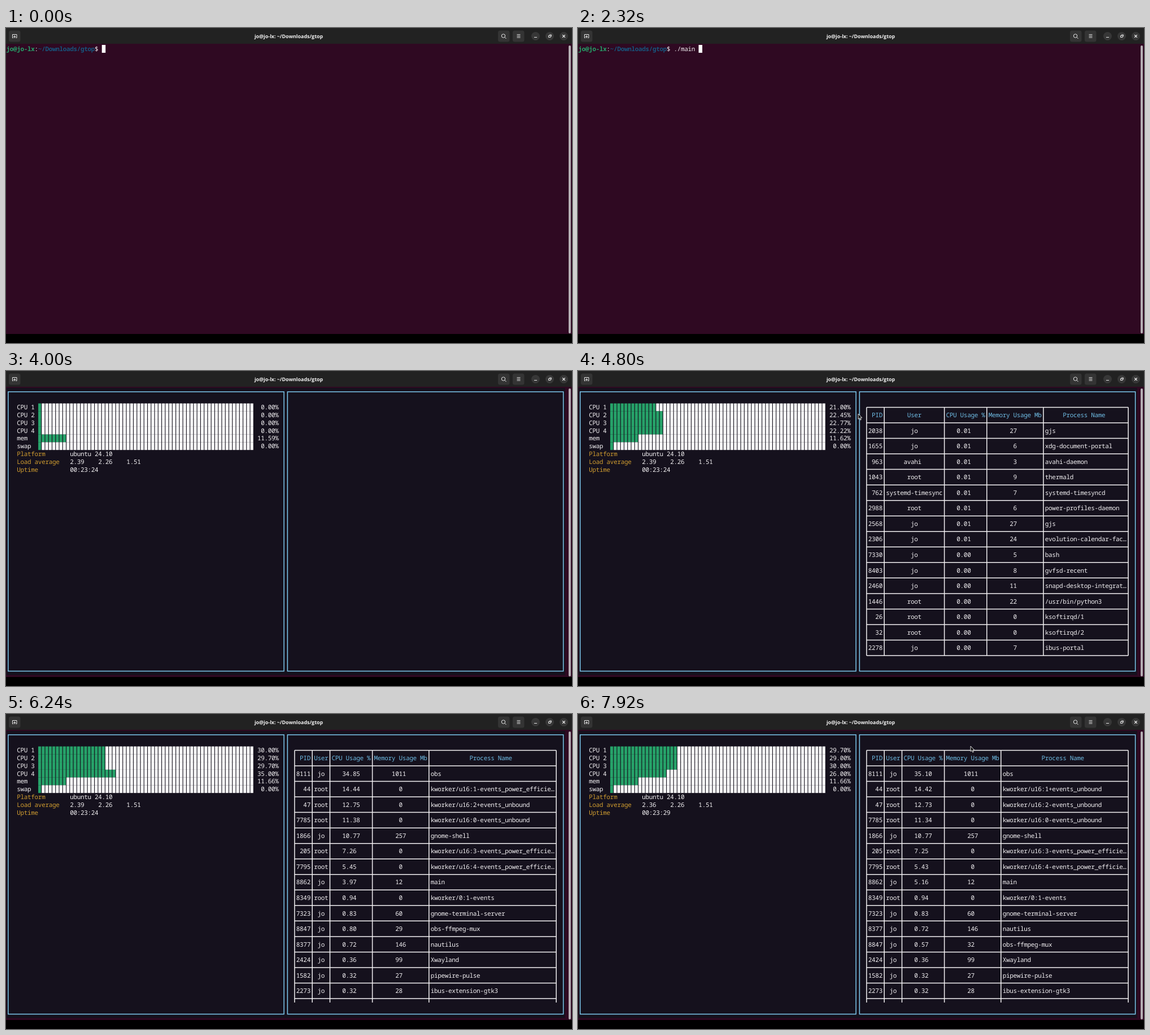
Animation, 1002 px wide and 559 px high, one loop 8000 ms. Source, as an HTML page with a canvas:

```html
<!DOCTYPE html>
<html lang="en">
<head>
<meta charset="utf-8">
<title>Terminal system monitor</title>
<style>
  html, body { margin: 0; width: 100%; height: 100%; overflow: hidden; background: #000; }
  canvas { display: block; width: 1002px; height: 559px; }
</style>
</head>
<body>
<canvas id="stage" width="1002" height="559"></canvas>
<script>
const ctx = document.getElementById('stage').getContext('2d');
ctx.textRendering = 'geometricPrecision';

const LOOP = 8000, CELL_W = 6.26, CELL_H = 13.77;
const MONO = '11px "Noto Sans Mono", "DejaVu Sans Mono", monospace';
const WHITE = '#f3f1f3', GREEN = '#26a269', BLUE = '#7dc8ee', GOLD = '#cf9c30', DARK = '#15111d';

// Terminal grid
const colX = col => 0.7 + col * CELL_W;
const rowY = row => 30 + row * CELL_H;
const midX = col => colX(col + 0.5);
const midY = row => rowY(row + 0.5);

function rect(x, y, w, h, color) {
  ctx.fillStyle = color;
  ctx.fillRect(x, y, w, h);
}

function roundRect(x, y, w, h, r, color) {
  ctx.fillStyle = color;
  ctx.beginPath();
  ctx.roundRect(x, y, w, h, r);
  ctx.fill();
}

function stroke(path, color = '#e8e8e8', width = 1) {
  ctx.strokeStyle = color;
  ctx.lineWidth = width;
  ctx.stroke(new Path2D(path));
}

function print(col, row, text, color = WHITE, bold = false) {
  ctx.font = (bold ? 'bold ' : '') + MONO;
  ctx.textAlign = 'center';
  ctx.fillStyle = color;
  [...text].forEach((char, i) => {
    if (char !== ' ') ctx.fillText(char, midX(col + i), rowY(row) + 10.8);
  });
}

function printCentered(col, width, row, text, color) {
  print(col + Math.floor((width - text.length) / 2), row, text, color);
}

// Latest entry of a [time, value] timeline
const at = (timeline, t) => timeline.findLast(([start]) => t >= start)[1];

const parse = text => text.trim().split('\n').map(line => line.trim().split(' '));

const firstProcesses = parse(`
  2038 jo 0.01 27 gjs
  1655 jo 0.01 6 xdg-document-portal
  963 avahi 0.01 3 avahi-daemon
  1043 root 0.01 9 thermald
  762 systemd-timesync 0.01 7 systemd-timesyncd
  2988 root 0.01 6 power-profiles-daemon
  2568 jo 0.01 27 gjs
  2306 jo 0.01 24 evolution-calendar-fac…
  7330 jo 0.00 5 bash
  8403 jo 0.00 8 gvfsd-recent
  2460 jo 0.00 11 snapd-desktop-integrat…
  1446 root 0.00 22 /usr/bin/python3
  26 root 0.00 0 ksoftirqd/1
  32 root 0.00 0 ksoftirqd/2
  2278 jo 0.00 7 ibus-portal`);

const busiest = parse(`
  8111 jo 34.85 1011 obs
  44 root 14.44 0 kworker/u16:1-events_power_efficie…
  47 root 12.75 0 kworker/u16:2+events_unbound
  7785 root 11.38 0 kworker/u16:0-events_unbound
  1866 jo 10.77 257 gnome-shell
  205 root 7.26 0 kworker/u16:3-events_power_efficie…
  7795 root 5.45 0 kworker/u16:4-events_power_efficie…
  8862 jo 3.97 12 main
  8349 root 0.94 0 kworker/0:1-events
  7323 jo 0.83 60 gnome-terminal-server
  8847 jo 0.80 29 obs-ffmpeg-mux
  8377 jo 0.72 146 nautilus
  2424 jo 0.36 99 Xwayland
  1582 jo 0.32 27 pipewire-pulse
  2273 jo 0.32 28 ibus-extension-gtk3`);

const updates = parse(`
  8111 jo 35.10 1011 obs
  44 root 14.42 0 kworker/u16:1+events_unbound
  47 root 12.73 0 kworker/u16:2-events_unbound
  7785 root 11.34 0 kworker/u16:0-events_unbound
  205 root 7.25 0 kworker/u16:3-events_power_efficie…
  7795 root 5.43 0 kworker/u16:4-events_power_efficie…
  8862 jo 5.16 12 main
  8847 jo 0.57 32 obs-ffmpeg-mux`);

const busiestLater = busiest
  .map(old => updates.find(([pid]) => pid === old[0]) || old)
  .sort((a, b) => b[2] - a[2]);

const tables = [
  [0, null],
  [4480, { rows: firstProcesses }],
  [6160, { rows: busiest, more: true }],
  [6960, { rows: busiestLater, more: true }],
];

// Each meter: percentage and number of filled cells
const idle = ['0.00', 1];
const meters = [
  [0, [idle, idle, idle, idle, idle, idle]],
  [3440, [idle, idle, idle, idle, ['11.59', 8], idle]],
  [4480, [['21.00', 13], ['22.45', 15], ['22.77', 15], ['22.22', 15], ['11.62', 8], idle]],
  [6160, [['30.00', 19], ['29.70', 19], ['29.70', 19], ['35.00', 22], ['11.66', 8], idle]],
  [7920, [['29.70', 19], ['29.00', 19], ['30.00', 19], ['26.00', 16], ['11.66', 8], idle]],
];
const meterNames = ['CPU 1', 'CPU 2', 'CPU 3', 'CPU 4', 'mem', 'swap'];

const typing = [[0, ''], [1360, '.'], [1520, './'], [1840, './m'], [2000, './main ']];
const START = 2400;

function drawWindow() {
  rect(0, 0, 1002, 559, '#000');
  rect(0, 28, 1002, 515, '#2f0922');
  rect(0, 0, 1002, 28, '#222');
  ctx.font = 'bold 8.9px "Open Sans", "Noto Sans", sans-serif';
  ctx.textAlign = 'center';
  ctx.fillStyle = '#f4f4f4';
  ctx.fillText('jo@jo-lx: ~/Downloads/gtop', 500.5, 17.5);

  for (const x of [5, 871, 897]) roundRect(x, 4.5, 20.5, 20, 3.5, '#343434');
  for (const x of [937.5, 962.5, 987.5]) roundRect(x - 7.5, 7, 15, 15, 7.5, '#373737');
  stroke('M13 17.5h-1.5v-6h7.500v6h-1.5M15.200 13v5M13 15.500h4.500');
  stroke('M883.700 14a3.200 3.200 0 1 1-6.400 0a3.200 3.200 0 1 1 6.400 0M882.800 16.300l2.700 2.700');
  stroke('M904.500 11.700h6M904.500 14.300h6M904.500 16.900h6');
  stroke('M935 16.500h5');
  stroke('M960.500 13.500h3.500v3h-3.500zM961.800 12h3.600v3.200');
  stroke('M985.200 12.200l4.600 4.600M989.800 12.200l-4.600 4.600', '#fff', 1.2);
  roundRect(996, 31, 4, 511, 2, '#b6afb4');
}

function drawPrompt(t) {
  const typed = at(typing, t);
  print(0, 0, 'jo@jo-lx', GREEN, true);
  print(8, 0, ':');
  print(9, 0, '~/Downloads/gtop', '#17557d', true);
  print(25, 0, '$ ' + typed);
  const blinkedOff = t >= 1200 && t < 1360;
  if (!blinkedOff) rect(colX(27 + typed.length), 30, 6.5, 14, '#fff');
}

function drawPane(first, last) {
  ctx.strokeStyle = BLUE;
  ctx.lineWidth = 1.5;
  ctx.strokeRect(midX(first), midY(0), midX(last) - midX(first), midY(36) - midY(0));
}

function drawMeters(t) {
  at(meters, t).forEach(([percent, filled], i) => {
    const row = 2 + i;
    print(3, row, meterNames[i]);
    for (let n = 0; n < 61; n++) {
      rect(colX(9 + n), rowY(row), 5.1, CELL_H, n < filled ? GREEN : '#fff');
    }
    print(71, row, (percent + '%').padStart(6));
  });
}

function drawInfo(t) {
  const later = t >= 7440;
  const lines = [
    ['Platform', 'ubuntu 24.10'],
    ['Load average', (later ? '2.36' : '2.39') + '    2.26    1.51'],
    ['Uptime', later ? '00:23:29' : '00:23:24'],
  ];
  lines.forEach(([label, value], i) => {
    print(3, 8 + i, label, GOLD);
    print(18, 8 + i, value);
  });
}

function drawTable({ rows, more }) {
  const userWidth = Math.max(4, ...rows.map(row => row[1].length));
  const afterUser = 87 + userWidth;
  const edges = [81, 86, afterUser, afterUser + 12, afterUser + 28, 155];
  const bottom = more ? rowY(35) : midY(34);
  let grid = '';
  for (const col of edges) grid += `M${midX(col)} ${midY(2)}V${bottom}`;
  for (let row = 2; row <= 34; row += 2) grid += `M${midX(81)} ${midY(row)}H${midX(155)}`;
  stroke(grid, WHITE, 1.5);

  const header = ['PID', 'User', 'CPU Usage %', 'Memory Usage Mb', 'Process Name'];
  [header, ...rows].forEach((cells, i) => {
    const row = 3 + 2 * i, color = i ? WHITE : '#6fbce4';
    cells.forEach((text, c) => {
      const col = edges[c] + 1, width = edges[c + 1] - col;
      if (c === 0) print(col, row, text.padStart(4), color);
      else if (c === 4 && i) print(col, row, text, color);
      else printCentered(col, width, row, text, color);
    });
  });
}

function drawPointer(x, y) {
  const arrow = new Path2D('M0 0V9.500L2.200 7.500L3.800 11L5.300 10.300L3.800 7H6.800Z');
  ctx.save();
  ctx.translate(x, y);
  ctx.fillStyle = '#111';
  ctx.fill(arrow);
  ctx.strokeStyle = '#eee';
  ctx.lineWidth = 0.9;
  ctx.stroke(arrow);
  ctx.restore();
}

function drawMouse(t) {
  if (t >= 4640 && t < 5440) drawPointer(496, 76);
  if (t >= 7520) {
    const p = Math.min(1, (t - 7520) / 400), ease = p * (2 - p);
    drawPointer(726 - 31 * ease, 84 - 27 * ease);
  }
}

function drawMonitor(t) {
  rect(colX(0), rowY(0), 158 * CELL_W, 37 * CELL_H, DARK);
  drawPane(0, 78);
  drawPane(79, 157);
  drawMeters(t);
  drawInfo(t);
  const table = at(tables, t);
  if (table) drawTable(table);
  drawMouse(t);
}

function frame() {
  const t = performance.now() % LOOP;
  drawWindow();
  if (t < START) drawPrompt(t);
  else drawMonitor(t);
  requestAnimationFrame(frame);
}
frame();
</script>
</body>
</html>
```
